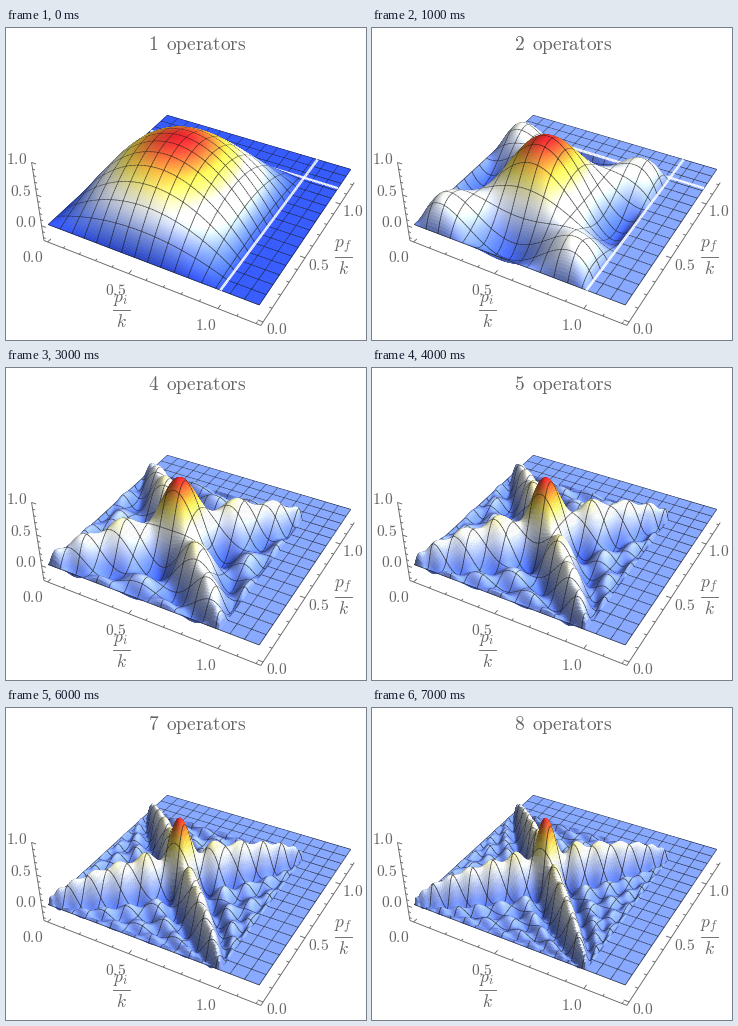
Recreate the animation shown at these times as a matplotlib script. Size 360 by 312 pixels, loop 8 s.

```python
import numpy as np
import matplotlib.pyplot as plt
from matplotlib.animation import FuncAnimation
from matplotlib.collections import LineCollection, PolyCollection
from numpy.polynomial import Legendre

plt.rcParams["mathtext.fontset"] = "cm"

W, H, DPI = 360, 312, 100
PX = 72 / DPI                      # one pixel in points
GRAY = "#666666"

# Camera: a 1 x 1 x 0.4 box centred on the origin
EYE = np.array([1.3, -2.4, 2.0])
DIST = np.linalg.norm(EYE)
FORWARD = -EYE / DIST
RIGHT = np.array([2.4, 1.3, 0]) / np.hypot(2.4, 1.3)
UP = np.cross(RIGHT, FORWARD)
SCALE, CX, CY = 800, 200.3, 145.3

P_MAX, PAD = 1.2, 0.02
Z_MIN, Z_MAX = -0.25, 1.0
CELLS, MESH = 144, 9               # grid cells, cells per mesh line
EDGE = round(CELLS / P_MAX)        # grid index of p = 1

COLORS = np.array([
    (0.179, 0.305, 0.934), (0.309, 0.442, 0.941), (0.453, 0.567, 0.950),
    (0.642, 0.720, 0.965), (0.820, 0.866, 0.975), (0.940, 0.950, 0.930),
    (0.955, 0.940, 0.720), (0.950, 0.900, 0.420), (0.940, 0.740, 0.250),
    (0.900, 0.450, 0.200), (0.817, 0.134, 0.164)])

# Lights in camera space: (right, up, toward the viewer)
LIGHTS = np.array([(0, 1, 1), (1, 1, 1), (1, 0, 1)], float)
LIGHTS /= np.linalg.norm(LIGHTS, axis=1, keepdims=True)
AMBIENT, DIFFUSE = 0.35, 0.37


def project(p):
    p = np.asarray(p, float)
    depth = DIST + p @ FORWARD
    return np.stack([CX + SCALE * (p @ RIGHT) / depth,
                     CY - SCALE * (p @ UP) / depth], axis=-1)


def box_p(p):
    return (p / P_MAX - 0.5) / (1 + 2 * PAD)


def box_z(z):
    return -0.2 + 0.4 * (z - Z_MIN) / (Z_MAX - Z_MIN)


def surface(count):
    """Kernel of the first even Gegenbauer (3/2) modes, zero outside p < 1."""
    p = np.linspace(0, P_MAX, CELLS + 1)
    u = 2 * p - 1
    z = np.zeros((CELLS + 1, CELLS + 1))
    for n in range(1, 2 * count, 2):
        mode = (1 - u**2) * Legendre.basis(n).deriv()(u)
        z += np.outer(mode, mode) * (2 * n + 1) / (n * (n + 1))
    z[EDGE:, :] = 0
    z[:, EDGE:] = 0
    return p, np.clip(z / z.max(), Z_MIN, Z_MAX)


def shade(world, z):
    low = Z_MIN if z.min() < -0.01 else 0
    level = (z - low) / (Z_MAX - low)
    mid = (level[1:, 1:] + level[:-1, 1:] + level[1:, :-1] + level[:-1, :-1]) / 4
    stops = np.linspace(0, 1, len(COLORS))
    base = np.stack([np.interp(mid, stops, c) for c in COLORS.T], axis=-1)
    normal = np.cross(world[1:, 1:] - world[:-1, :-1],
                      world[:-1, 1:] - world[1:, :-1])
    normal /= np.linalg.norm(normal, axis=-1, keepdims=True)
    in_camera = normal @ np.stack([RIGHT, UP, -FORWARD], axis=1)
    light = AMBIENT + DIFFUSE * np.clip(in_camera @ LIGHTS.T, 0, None).sum(-1)
    rgb = np.clip(base * light[..., None], 0, 1)
    return np.concatenate([rgb, np.ones_like(rgb[..., :1])], axis=-1)


def grid_lines(world, rows):
    """Segments along both directions at the given grid indices."""
    ends = []
    for g in (world, world.swapaxes(0, 1)):
        a, b = g[rows, :-1], g[rows, 1:]
        ends.append(np.stack([a, b, b, a], axis=2).reshape(-1, 4, 3))
    return np.concatenate(ends)


def build(count):
    """Cells and lines of the surface, ordered back to front."""
    p, z = surface(count)
    x, y = np.meshgrid(box_p(p), box_p(p), indexing="ij")
    world = np.stack([x, y, box_z(z)], axis=-1)
    quads = np.stack([world[:-1, :-1], world[1:, :-1],
                      world[1:, 1:], world[:-1, 1:]], axis=2).reshape(-1, 4, 3)
    fill = shade(world, z).reshape(-1, 4)
    parts = [(quads, fill, fill, 0.5, 0)]

    def add_lines(rows, color, width, lift):
        seg = grid_lines(world, rows)
        parts.append((seg, np.zeros((len(seg), 4)),
                      np.tile(color, (len(seg), 1)), width, lift))

    add_lines(np.arange(0, CELLS + 1, MESH), (0.1, 0.1, 0.1, 0.85), 0.75, 0.8)
    if count < 3:
        add_lines(np.array([EDGE]), (1, 1, 1, 1), 2.6, 1.6)

    cell = 1 / (1 + 2 * PAD) / CELLS
    shapes = np.concatenate([q[0] for q in parts])
    faces = np.concatenate([q[1] for q in parts])
    edges = np.concatenate([q[2] for q in parts])
    widths = np.concatenate([np.full(len(q[0]), q[3] * PX) for q in parts])
    lifts = np.concatenate([np.full(len(q[0]), q[4] * cell) for q in parts])
    centre = shapes.mean(axis=1)
    near = np.hypot(centre[:, 0] - EYE[0], centre[:, 1] - EYE[1]) - lifts
    order = np.argsort(-near, kind="stable")
    return project(shapes[order]), faces[order], edges[order], widths[order]


fig = plt.figure(figsize=(W / DPI, H / DPI), dpi=DPI, facecolor="white")
ax = fig.add_axes([0, 0, 1, 1])
ax.set_xlim(0, W)
ax.set_ylim(H, 0)
ax.axis("off")


def label(x, y, text, size, **kw):
    style = dict(ha="center", va="center", color=GRAY)
    style.update(kw)
    return ax.text(x, y, text, fontsize=size * PX, **style)


def draw_axes():
    lo, hi = -0.5, 0.5
    lines = [[(lo, lo, -0.2), (hi, lo, -0.2)],
             [(hi, lo, -0.2), (hi, hi, -0.2)],
             [(lo, lo, -0.2), (lo, lo, 0.2)]]

    def tick(start, direction, index):
        size = 0.022 if index % 5 == 0 else 0.012
        start = np.array(start)
        lines.append([start, start + size * np.array(direction)])

    for i in range(13):
        at = box_p(i / 10)
        tick((at, lo, -0.2), (0, 1, 0), i)
        tick((hi, at, -0.2), (-1, 0, 0), i)
    for i in range(-2, 11):
        tick((lo, lo, box_z(i / 10)), (1, 0, 0), i)
    ax.add_collection(LineCollection(project(lines), colors=GRAY,
                                     linewidths=0.9 * PX, zorder=1))


def draw_fraction(x, y, top):
    label(x, y - 10.7, f"${top}$", 17.5)
    label(x, y + 11.5, "$k$", 17.5)
    ax.plot([x - 8.5, x + 8.5], [y, y], color=GRAY, lw=0.9 * PX)


draw_axes()
places = {"0.0": [(27, 230), (271, 302), (20, 194.5)],
          "0.5": [(109.2, 262.5), (313, 237.5), (15, 163)],
          "1.0": [(200, 297), (347, 183.5), (10.5, 131.5)]}
for text, spots in places.items():
    for spot in spots:
        label(*spot, rf"$\mathrm{{{text}}}$", 15.5)
draw_fraction(115, 282.2, "p_i")
draw_fraction(337.5, 229.3, "p_f")

title = label(142.5, 22, "", 19.4, ha="left", va="baseline")
plot = PolyCollection([], zorder=2)
ax.add_collection(plot, autolim=False)


def update(step):
    count = step + 1
    verts, faces, edges, widths = build(count)
    plot.set_verts(verts)
    plot.set_facecolor(faces)
    plot.set_edgecolor(edges)
    plot.set_linewidth(widths)
    title.set_text(rf"$\mathrm{{{count}\ \,operators}}$")
    return plot, title


anim = FuncAnimation(fig, update, frames=8, interval=1000, repeat=True,
                     repeat_delay=0, blit=False)
plt.show()
```
